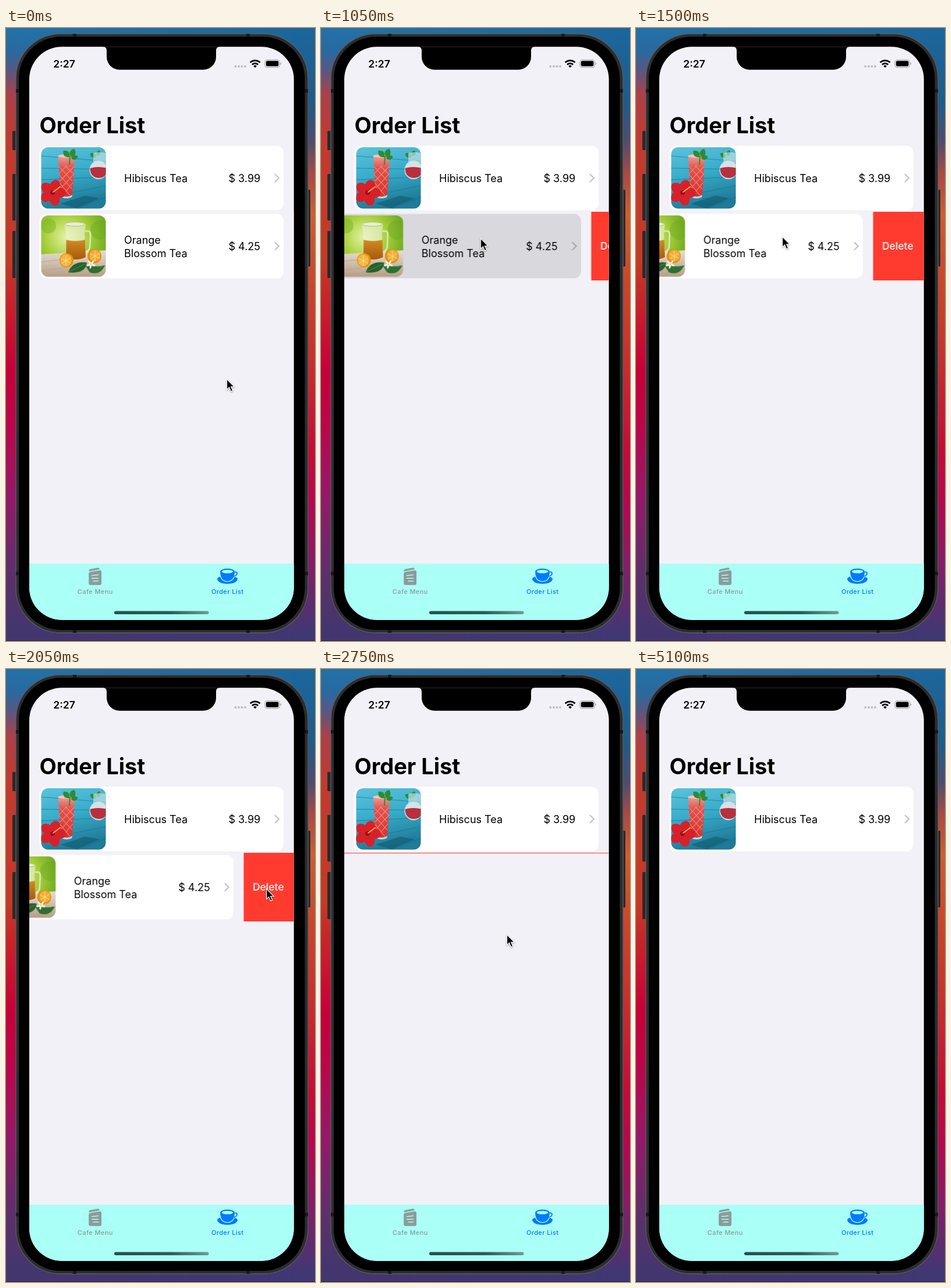
Write an HTML page that moves like this. It is 531 by 1054 pixels and loops after 5.28 s.

```html
<!DOCTYPE html>
<html lang="en">
<head>
<meta charset="utf-8">
<title>Order List</title>
<style>
  html, body { margin: 0; width: 100%; height: 100%; overflow: hidden; }
  body {
    position: relative;
    background: linear-gradient(#2272a8 0, #29699e 40px, #5c5680 75px, #ad4048 115px, #c13a2f 200px,
      #c33a25 400px, #c81a2d 500px, #c60038 590px, #b9074c 690px, #93196a 810px, #5f2f69 930px, #43366e 1035px);
  }
  .right {
    position: absolute; inset: 0;
    background: linear-gradient(#1b679d 0, #1f5b8a 130px, #4d4d70 195px, #a84a45 250px, #cc5f30 320px,
      #c9482a 430px, #c7302d 570px, #c50b37 730px, #b50750 820px, #7f2069 930px, #3f3873 1040px);
    -webkit-mask-image: linear-gradient(90deg, transparent 15%, #000 95%);
    mask-image: linear-gradient(90deg, transparent 15%, #000 95%);
  }
  svg { position: absolute; left: 0; top: 0; display: block; }
  text { font-family: Inter, "Liberation Sans", sans-serif; font-optical-sizing: none; font-size: 18px; }
  .title { font-size: 38px; font-weight: 700; }
  .clock { font-size: 17.5px; font-weight: 600; }
  .action { font-size: 17.3px; font-weight: 500; letter-spacing: .1px; }
  .tab { font-size: 11px; font-weight: 500; letter-spacing: .4px; text-anchor: middle; }
</style>
</head>
<body>
<div class="right"></div>
<svg width="531" height="1054" viewBox="0 0 531 1054">
  <defs>
    <clipPath id="screen"><rect x="40" y="32.3" width="454.7" height="985.4" rx="56"/></clipPath>
    <clipPath id="photo"><rect x="60.5" y="205" width="111" height="105.5" rx="12"/></clipPath>
    <clipPath id="cell"><rect id="cellBox" x="40" y="316.4" width="455" height="117"/></clipPath>
    <linearGradient id="wood" x2=".25" y2="1">
      <stop stop-color="#5cc3dc"/><stop offset=".5" stop-color="#38acca"/><stop offset="1" stop-color="#1f7b98"/>
    </linearGradient>
    <linearGradient id="juice" y2="1" x2="0">
      <stop stop-color="#e9a39c"/><stop offset=".3" stop-color="#e2534c"/><stop offset="1" stop-color="#d8322f"/>
    </linearGradient>
    <radialGradient id="garden" cx=".4" cy=".35" r=".75">
      <stop stop-color="#e6f3a8"/><stop offset=".45" stop-color="#a8d13c"/><stop offset="1" stop-color="#5c9c18"/>
    </radialGradient>
    <linearGradient id="table" y2="1" x2="0">
      <stop stop-color="#e6ddd2"/><stop offset="1" stop-color="#b59c84"/>
    </linearGradient>
    <linearGradient id="tea" y2="1" x2="0">
      <stop stop-color="#d08c22"/><stop offset="1" stop-color="#a9580c"/>
    </linearGradient>
    <linearGradient id="home">
      <stop stop-color="#24504e"/><stop offset=".6" stop-color="#2f5a58"/><stop offset="1" stop-color="#6d9d98"/>
    </linearGradient>
    <path id="chevron" d="M462.6 251.8l6.4 6.2-6.4 6.2" fill="none" stroke="#3c3c43" stroke-opacity=".3" stroke-width="2.2" stroke-linecap="round" stroke-linejoin="round"/>
    <path id="leaf" d="M0 0C-7-3-8-10-2-15C5-11 6-5 0 0Z"/>
  </defs>

  <!-- phone body -->
  <g fill="#2b2829">
    <rect x="11" y="177" width="8" height="33" rx="1.5"/>
    <rect x="11" y="251" width="8" height="80" rx="1.5"/>
    <rect x="11" y="349" width="8" height="81" rx="1.5"/>
    <rect x="516" y="278" width="7" height="132" rx="1.5"/>
  </g>
  <rect x="17" y="10" width="502" height="1030" rx="77" fill="#2c2d2f" stroke="#5b5d60" stroke-width="1.3"/>
  <path d="M17 108h6M17 938h6M513 108h6M513 938h6M118 10v6M416 10v6M118 1034v6M416 1034v6" stroke="#17181a" stroke-width="6"/>
  <rect x="22" y="15" width="491.5" height="1020" rx="72"/>
  <path d="M0 1053.5H531" stroke="#2b2440"/>

  <g clip-path="url(#screen)">
    <rect x="40" y="32" width="455" height="986" fill="#f2f1f7"/>
    <path d="M166 32q7 0 7 7v10.700a22 22 0 0 0 22 22h144a22 22 0 0 0 22-22v-10.700q0-7 7-7z"/>

    <!-- status bar -->
    <text class="clock" x="81.3" y="67.7">2:27</text>
    <path d="M394.3 66h.01M399.9 66h.01M405.4 66h.01M410.9 66h.01" stroke="#bdbdc2" stroke-width="4" stroke-linecap="round"/>
    <g fill="none" stroke="#000" stroke-width="2.7">
      <path d="M419.600 59.300a12.200 12.200 0 0 1 17 0"/>
      <path d="M423 63a7.400 7.400 0 0 1 10.200 0"/>
    </g>
    <path d="M428.100 68.300l-2.800-2.900a4 4 0 0 1 5.600 0z"/>
    <rect x="445" y="54.8" width="25.2" height="12.8" rx="3.8" fill="none" stroke="#a3a3a8" stroke-width="1.1"/>
    <rect x="446.8" y="56.6" width="21.6" height="9.2" rx="2.2"/>
    <path d="M471.6 59v4.4q1.5-.6 1.5-2.2t-1.5-2.2z" fill="#a3a3a8"/>

    <text class="title" x="57.4" y="180.7">Order List</text>

    <!-- first row -->
    <rect x="57.5" y="202.5" width="419.5" height="111" rx="12" fill="#fff"/>
    <g clip-path="url(#photo)">
      <rect x="60" y="204" width="112" height="108" fill="url(#wood)"/>
      <g stroke="#14718c" stroke-width="1.2" opacity=".65">
        <path d="M60 220l112 9M60 241l112 2M60 261l112-5M60 294l112-23M122 311l50-20"/>
      </g>
      <path d="M94 302l42-14 25 5-40 17z" fill="#0f5268" opacity=".5"/>
      <path d="M89.5 219h29l-4.5 68q-10 6-20 0z" fill="url(#juice)"/>
      <path d="M91 238l23 25M91 252l23 25M92 266l18 22M102 237l15 15M117 238l-24 25M116 252l-23 25M115 266l-18 22M104 237l-13 14" stroke="#f3a49a" stroke-width="1.1" opacity=".75"/>
      <ellipse cx="104" cy="220" rx="14.5" ry="3" fill="#f0c5bb"/>
      <path d="M94 287q10 6 20 0l-1 4q-9 4-18 0z" fill="#b9dbe2"/>
      <g fill="#2f8b34">
        <use href="#leaf" transform="translate(109 222) rotate(-35)"/>
        <use href="#leaf" transform="translate(112 222) rotate(28)"/>
        <use href="#leaf" transform="translate(112 224) rotate(85) scale(.8)"/>
        <path d="M110 220l-1 15" stroke="#2f8b34" stroke-width="2"/>
        <use href="#leaf" transform="translate(155 222) rotate(-50) scale(.8)"/>
        <use href="#leaf" transform="translate(157 220) rotate(30) scale(.7)"/>
      </g>
      <path d="M150 215q11-3 22 0v17h-22z" fill="#d5e8ea" opacity=".6"/>
      <ellipse cx="159" cy="244" rx="15.5" ry="16" fill="#d3e3e6"/>
      <path d="M144.500 241q14-4 29.500 0q1 16-14.500 17q-15-1-15-17z" fill="#b92f3e"/>
      <g id="petals" fill="#d8202a"></g>
      <circle cx="80" cy="283" r="4" fill="#96101f"/>
      <path d="M81 282l12-9" stroke="#f0b03f" stroke-width="2" stroke-linecap="round"/>
    </g>
    <text x="203" y="264.8">Hibiscus Tea</text>
    <text x="382.5" y="264.8">$ 3.99</text>
    <use href="#chevron"/>

    <!-- second row -->
    <g id="order" clip-path="url(#cell)">
      <rect x="40" y="316" width="455" height="118" fill="#f2f1f7"/>
      <g id="swipe">
        <rect x="57.5" y="319.5" width="419.5" height="111" rx="12" fill="#fff"/>
        <rect id="press" x="57.5" y="319.5" width="419.5" height="111" rx="12" fill="#d9d8dd" opacity="0"/>
        <g transform="translate(0 117.2)">
          <g clip-path="url(#photo)">
            <rect x="60" y="204" width="112" height="108" fill="url(#garden)"/>
            <circle cx="73" cy="223" r="13" fill="#79b324" opacity=".5"/>
            <circle cx="162" cy="230" r="17" fill="#66a51e" opacity=".4"/>
            <path d="M60 272l112-7v47h-112z" fill="url(#table)"/>
            <path d="M60 285l60-7M60 301l50-8M130 309l42-17" stroke="#b9a48f"/>
            <path d="M136 232h5q4 0 4 6l-1 22q-1 6-8 8" fill="none" stroke="#dfe8c9" stroke-width="2.500"/>
            <path d="M100 220q19-6 37 0l-2 17 3 41q-18 8-36 0l1-41z" fill="#eef4d8" opacity=".6"/>
            <path d="M103.500 247q15 4 32.500 0l1 30q-17 8-34 0z" fill="url(#tea)"/>
            <ellipse cx="118.500" cy="220" rx="18" ry="3.500" fill="#f3f7df" fill-opacity=".7" stroke="#a9b982"/>
            <circle cx="152" cy="275" r="12" fill="#e0900f"/>
            <circle cx="104" cy="282" r="12" fill="#e6940c"/>
            <ellipse cx="103" cy="282" rx="9.500" ry="10.500" fill="#f4b53a"/>
            <ellipse cx="153" cy="274" rx="9.500" ry="10" fill="#f2ae30"/>
            <path d="M103 274v18M95 279l16 8M95 288l16-10M153 266v18M145 271l16 8M145 280l16-10" stroke="#fbe2a0" stroke-width="1"/>
            <path d="M107 303q7-20 32-17q-2 20-32 17z" fill="#24612b"/>
            <path d="M136 291q15 3 34 0q-8 18-26 12z" fill="#2d7031"/>
            <path d="M108 302l29-14M138 292l27 1" stroke="#6d9a55" stroke-width=".8"/>
            <path d="M146 289l-4-5M146 289l4-5M146 289l-1 6M146 289l6 2M146 289l-6 2" stroke="#fbfaf0" stroke-width="2.800" stroke-linecap="round"/>
            <circle cx="146" cy="289" r="1.500" fill="#e6c44d"/>
          </g>
        </g>
        <text x="203" y="370.6">Orange</text>
        <text x="203" y="393.7">Blossom Tea</text>
        <text x="382.5" y="381.9">$ 4.25</text>
        <use href="#chevron" y="117.1"/>
        <rect x="494.7" y="316" width="470" height="118" fill="#ff3b30"/>
        <text class="action" x="510.3" y="381.2" fill="#fff">Delete</text>
      </g>
    </g>

    <!-- tab bar -->
    <rect x="40" y="921" width="455" height="97" fill="#aafff6"/>
    <g fill="#8c9b9b">
      <path d="M142.5 934.2v-1.2q0-2 2-2.4l13.5-2.500q2.300-.3 2.500 2v.8z"/>
      <path d="M144.500 935.200l16.500-2.600q3-.3 3 2.400v20q0 2.800-2.800 2.800h-16q-3 0-3-3v-16.800q0-2.400 2.300-2.800z"/>
    </g>
    <path d="M147.500 941.600l11-1.400M147.500 946.200h11M150 951h8.500" stroke="#aafff6" stroke-width="1.500" stroke-linecap="round"/>
    <g fill="#007aff">
      <path d="M363 947.500q0-3.500 7-4.500h20q8 1 8 4.500q-2 8-17.500 8.200q-15.500-.2-17.500-8.200z"/>
      <path d="M367.500 934.500q0 16.500 13 17.200q13-.7 13-17.200z" stroke="#aafff6" stroke-width="1.300"/>
      <ellipse cx="380.500" cy="934.300" rx="12.300" ry="4.700"/>
    </g>
    <ellipse cx="380.500" cy="934.600" rx="10" ry="2.900" fill="#aafff6"/>
    <path d="M393 935.700q4-1.300 4 2.300q-.5 4-6 4.600" fill="none" stroke="#007aff" stroke-width="1.800"/>
    <text class="tab" x="153.300" y="973.200" fill="#8c9b9b">Cafe Menu</text>
    <text class="tab" x="380.700" y="973.200" fill="#007aff">Order List</text>
    <rect x="186" y="1002.500" width="162.500" height="5.500" rx="2.750" fill="url(#home)"/>
  </g>

  <g id="cursor" style="filter: drop-shadow(0 1px 1.2px rgba(0,0,0,.4))">
    <path d="M.5 .8v18l4.100-3.900 3 7 3.100-1.300-3-6.800h5.600z" stroke="#fff" stroke-width="1.200"/>
  </g>
</svg>
<script>
const LOOP = 5280;
const $ = id => document.getElementById(id);

for (let i = 0; i < 5; i++) {
  const petal = document.createElementNS('http://www.w3.org/2000/svg', 'ellipse');
  const set = { cx: 80, cy: 272, rx: 9, ry: 12, transform: `rotate(${i * 72 + 20} 80 283)` };
  for (const key in set) petal.setAttribute(key, set[key]);
  $('petals').append(petal);
}

// Each step is [time in ms, value, easing towards the next step].
function track(id, prop, format, steps) {
  const all = [...steps, [LOOP, steps[steps.length - 1][1]]];
  const frames = all.map(([time, value, easing = 'linear']) =>
    ({ offset: time / LOOP, [prop]: format(value), easing }));
  const anim = $(id).animate(frames, { duration: LOOP, iterations: Infinity });
  anim.startTime = document.timeline.currentTime || 0;
}

const px = v => `${v}px`;
const shift = v => `translateX(${v}px)`;
const point = ([x, y]) => `translate(${x}px, ${y}px)`;
const HOLD = 'step-end', OUT = 'ease-out';
const REACH = 'cubic-bezier(.35,0,.3,1)';
const SETTLE = 'cubic-bezier(.25,.1,.25,1)';

track('cursor', 'transform', point, [
  [0, [379, 603], REACH], [800, [314, 362]], [930, [314, 362]], [1050, [274, 361], OUT],
  [1300, [251, 358]], [1500, [251, 358], REACH], [2000, [447, 377]], [2300, [447, 377], REACH],
  [2750, [319, 456], REACH], [3650, [418, 491]],
]);
track('cursor', 'opacity', String, [[0, 1, HOLD], [5000, 0]]);

track('swipe', 'transform', shift, [
  [0, 0], [950, 0], [1050, -30.300, SETTLE], [1450, -87.500],
  [1500, -87.300, OUT], [1650, -86.300], [2200, -86.300, SETTLE], [2550, -456],
]);
track('press', 'opacity', String, [[0, 0, HOLD], [950, 1], [1070, 1], [1270, 0]]);
track('cellBox', 'height', px, [[0, 117], [2200, 117, SETTLE], [2740, .6]]);
track('order', 'opacity', String, [[0, 1, HOLD], [2800, 0]]);
</script>
</body>
</html>
```
